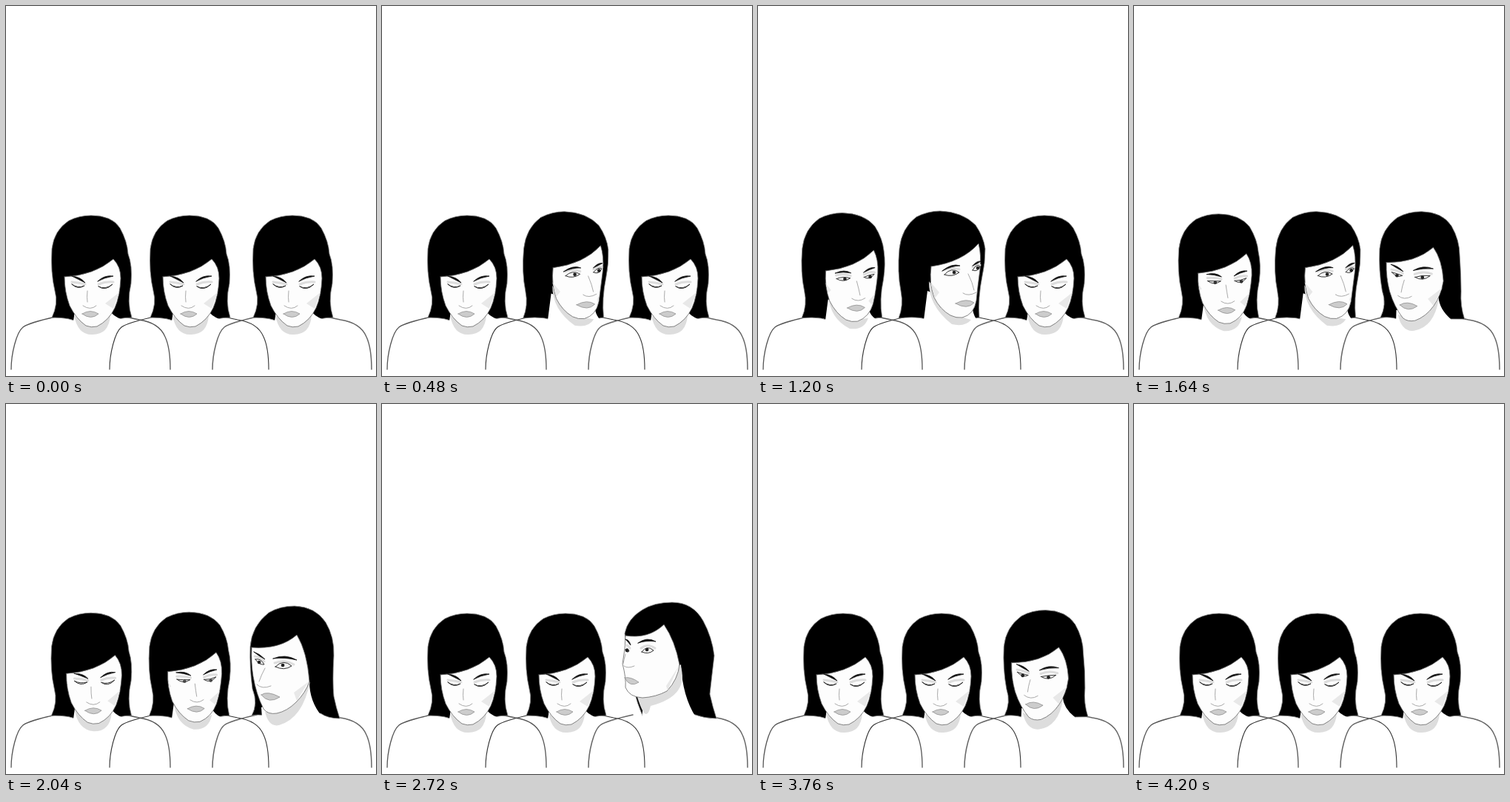
An HTML page that plays this animation: 500 by 500 pixels, repeating every 4.28 s.

```html
<!DOCTYPE html>
<html>
<head>
<meta charset="utf-8">
<style>
html, body { margin: 0; width: 100%; height: 100%; overflow: hidden; background: #fff; }
svg { display: block; width: 100vw; height: 100vh; }
path { fill: none; stroke-linecap: round; stroke-linejoin: round; }
.hair { fill: #000; stroke: #888; stroke-width: .8; }
.neck { fill: #fff; }
.shade { fill: #ddd; }
.face { fill: #fdfdfd; stroke: #666; stroke-width: .8; }
.cheek { fill: #e8e8e8; }
.lid { stroke: #ddd; stroke-width: 3; }
.eye { fill: #f4f4f4; stroke: #333; stroke-width: 1; }
.pupil { stroke: #222; stroke-width: 4.6; }
.brow { fill: #111; stroke: #111; stroke-width: .8; }
.nose { stroke: #aaa; stroke-width: 1; }
.mouth { fill: #ccc; stroke: #888; stroke-width: .7; }
</style>
</head>
<body>
<svg viewBox="0 0 500 500"></svg>
<script>
const LOOP = 4280, STEP = 40;
const BODY = 'M140 491C140 470 147 441 156 434Q164 428 200 420M294 420L313 424Q340 428 348 447Q355 462 355 491';

// Each part in four poses: looking down, turned right, half left, profile left
const parts = {
  hair: [
    'M195 421Q204 402 199 385Q193 360 195 328Q198 303 218 290Q232 283 248 283Q276 283 287 300Q297 318 298 335Q304 350 302 375Q296 400 303 421Q285 421 270 428L230 428Q222 421 195 421Z',
    'M190 422Q197 405 193 385Q188 360 191 328Q194 300 214 285Q230 277 246 277Q276 278 294 296Q305 312 307 328Q307 348 303 365Q297 395 299 421Q295 421 290 424L236 428Q225 418 190 422Z',
    'M193 421Q202 405 194 385Q190 355 191 328Q193 300 216 282Q231 273 251 273Q279 274 293 295Q305 315 304 340Q302 375 304 395Q307 410 312 425Q296 425 286 418L216 424Q206 418 193 421Z',
    'M213 421Q206 405 201 385Q193 340 189 310Q193 290 213 278Q229 268 253 268Q281 268 295 293Q307 315 310 340Q307 365 304 392Q308 410 313 425Q297 425 281 419L223 421Q217 419 213 421Z'],
  neck: [
    'M226 412L274 412Q276 418 290 424L290 440L222 440Z',
    'M229 385L290 410Q292 420 296 424L296 440L222 440Z',
    'M206 410L271 375Q271 402 288 422L288 440L208 440Z',
    'M215 390L265 352Q267 395 285 423L285 440L211 440Z'],
  shade: [
    'M225 418Q230 445 250 444Q272 444 274 418Q250 440 225 418Z',
    'M231 372Q230 405 262 430Q280 434 288 424Q262 420 231 372Z',
    'M211 416Q216 437 230 434Q262 425 272 375Q245 420 211 416Z',
    'M206 396Q218 435 224 408Q278 394 264 352Q245 396 206 396Z'],
  face: [
    'M212 366Q252 364 278 342Q288 352 288 368Q287 392 280 408Q272 425 256 433Q248 435 241 432Q228 423 219 405Q212 386 212 366Z',
    'M234 352Q276 346 298 321Q302 336 300 356Q297 378 295 398Q292 417 276 421Q268 422 260 418Q246 410 238 394Q231 374 234 352Z',
    'M193 329Q231 332 254 312Q268 335 271 375Q266 390 253 403Q241 415 227 418Q215 420 209 412Q199 392 195 368Q192 350 193 329Z',
    'M190 313Q221 318 242 298Q257 320 263 352Q261 372 246 388Q231 396 213 397Q195 396 190 383Q191 370 186 351Q190 330 190 313Z'],
  cheek: [
    'M267 402L286 387L278 409ZM213 376L214 380L213 378Z',
    'M294 396L295 390L294 400ZM233 373L245 387L239 395Z',
    'M250 390L270 375L254 401ZM195 365L196 367L196 369Z',
    'M245 381L262 354L247 387ZM191 365L191 367L191 368Z'],
  lid: [
    'M222 373Q232 374 240 376M258 376Q268 372 278 373',
    'M251 357Q262 352 272 356M290 353Q296 348 300 350',
    'M197 341Q205 342 210 348M224 350Q238 345 250 352',
    'M191 326Q194 326 196 330M211 330Q220 323 230 330'],
  eye: [
    'M222 376Q230 382 239 378Q230 384 222 376ZM258 379Q267 384 277 376Q267 386 258 379Z',
    'M252 363Q261 352 272 360Q262 367 252 363ZM290 357Q296 347 300 352Q297 360 290 357Z',
    'M198 345Q205 343 210 352Q203 353 198 345ZM225 355Q236 344 247 354Q237 361 225 355Z',
    'M190 332Q193 328 195 334Q192 337 190 332ZM212 335Q219 325 228 333Q221 339 212 335Z'],
  pupil: [
    'M231 381h.1M268 382h.1',
    'M265 360h.1M297 354h.1',
    'M203 349h.1M235 353h.1',
    'M192 333h.1M219 332h.1'],
  brow: [
    'M222 365Q234 366 240 374Q230 369 222 365ZM257 372Q266 363 278 365Q266 367 257 372Z',
    'M249 358Q262 347 273 351Q262 351 249 358ZM290 351Q296 344 301 345Q297 348 290 351Z',
    'M196 335Q203 337 211 345Q203 341 196 335ZM222 344Q238 337 254 346Q238 342 222 344Z',
    'M190 318Q195 318 197 326Q194 322 190 318ZM207 323Q219 314 231 321Q219 319 207 323Z'],
  nose: [
    'M243 385Q242 394 243 400M237 405Q247 412 255 405',
    'M284 362Q290 374 292 384M277 388Q284 393 295 387',
    'M211 357Q206 366 203 375M200 379Q207 386 219 381',
    'M190 338Q188 345 187 351M188 354Q193 358 202 354'],
  mouth: [
    'M236 416Q247 409 258 416Q248 425 236 416Z',
    'M267 402Q282 394 292 401Q283 411 267 402Z',
    'M206 393Q214 387 231 396Q216 406 206 393Z',
    'M189 370Q197 368 208 376Q196 384 189 370Z']
};

// keys: [time, position along the pose list]
const women = [
  { x: -133, line: '#555', width: 1.3, poses: [0, 1],
    keys: [[0, 0], [680, 0], [1160, .57], [1240, .57], [2040, .12], [2240, 0], [LOOP, 0]] },
  { x: 0, line: '#333', width: 1.1, poses: [0, 1],
    keys: [[0, 0], [480, .87], [600, 1], [1560, 1], [2040, .3], [2240, 0], [LOOP, 0]] },
  { x: 139, line: '#666', width: 1.5, poses: [0, 2, 3],
    keys: [[0, 0], [1200, 0], [2040, 1], [2320, 2], [2800, 2], [3200, 1], [4200, 0], [LOOP, 0]] }
];

const svg = document.querySelector('svg');
const add = (parent, tag, attrs) => {
  const el = document.createElementNS('http://www.w3.org/2000/svg', tag);
  for (const k in attrs) el.setAttribute(k, attrs[k]);
  return parent.appendChild(el);
};
const lerp = (a, b, t) => a + (b - a) * t;
const mix = (a, b, t) => {
  const nums = b.match(/[\d.]+/g);
  let i = 0;
  return a.replace(/[\d.]+/g, n => lerp(+n, +nums[i++], t).toFixed(2));
};
const valueAt = (keys, time) => {
  const i = keys.findIndex(k => k[0] > time);
  const [t0, v0] = keys[i - 1], [t1, v1] = keys[i];
  return lerp(v0, v1, (time - t0) / (t1 - t0));
};

for (const w of women) {
  const g = add(svg, 'g', { transform: `translate(${w.x})` });
  add(g, 'path', { d: BODY, stroke: w.line, 'stroke-width': w.width });
  w.paths = {};
  for (const name in parts) w.paths[name] = add(g, 'path', { class: name });
}

function draw(now) {
  const time = Math.floor(now % LOOP / STEP) * STEP;
  for (const w of women) {
    const pos = valueAt(w.keys, time);
    const i = Math.min(Math.floor(pos), w.poses.length - 2);
    for (const name in parts) {
      const shapes = w.poses.map(p => parts[name][p]);
      w.paths[name].setAttribute('d', mix(shapes[i], shapes[i + 1], pos - i));
    }
    w.paths.pupil.setAttribute('opacity', Math.max(0, Math.min(1, pos * 4 - .5)));
  }
}

const start = performance.now();
function tick() {
  draw(performance.now() - start);
  requestAnimationFrame(tick);
}
tick();
</script>
</body>
</html>
```
